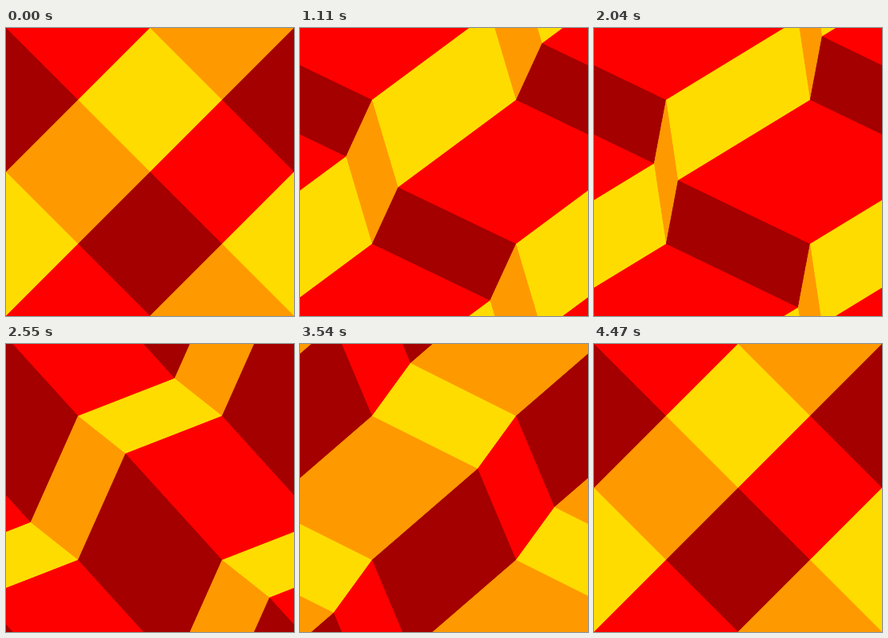
Write an HTML page with a canvas that moves like this. It is 360 by 360 pixels and loops after 4.5 s.

```html
<!DOCTYPE html>
<html>
<head>
<meta charset="utf-8">
<style>
  html, body { margin: 0; overflow: hidden; }
  canvas { display: block; }
</style>
</head>
<body>
<canvas width="360" height="360"></canvas>
<script>
const ctx = document.querySelector('canvas').getContext('2d');
const LOOP = 4500, STEP = 30, CELL = 180, HALF = 90;

// The last step repeats the first pose, so the curve closes after 149 steps
const PERIOD = LOOP / STEP - 1;

// Closed path of the moving corner: [step, x offset, y offset]
const path = [
  [0, 0, 0], [37, -57.5, 19.3], [68, -75, 10.5],
  [85, -30.7, -43], [104, 48.5, -27], [130, 19.8, -20.2]
];

// Path point by index, continued over the neighbouring loops
function point(i) {
  const n = path.length, lap = Math.floor(i / n);
  const [t, x, y] = path[i - lap * n];
  return [t + lap * PERIOD, x, y];
}

const slope = (a, b, axis) => (b[axis] - a[axis]) / (b[0] - a[0]);

// Tangent of the parabola through a point and its two neighbours
function tangent(i, axis) {
  const a = point(i - 1), b = point(i), c = point(i + 1);
  return slope(a, b, axis) + slope(b, c, axis) - slope(a, c, axis);
}

function offset(step, axis) {
  let i = 0;
  while (step >= point(i + 1)[0]) i++;
  const p = point(i), q = point(i + 1), h = q[0] - p[0], u = (step - p[0]) / h;
  const s = u * u * (3 - 2 * u);
  return p[axis] * (1 - s) + q[axis] * s
    + h * u * (1 - u) * ((1 - u) * tangent(i, axis) - u * tangent(i + 1, axis));
}

// Each tile lies between a moving corner and the next one in direction [dx, dy]
const tiles = [
  ['#ffdc00', 0, -1], ['#ff9900', -1, 0], ['#ff0000', 1, 0], ['#a40000', 0, 1]
];

function drawTile(paint, cx, cy, x, y, [color, dx, dy]) {
  const mx = cx + dx * HALF, my = cy + dy * HALF;
  ctx.fillStyle = ctx.strokeStyle = color;
  ctx.beginPath();
  ctx.moveTo(cx + x, cy + y);
  ctx.lineTo(mx + dy * HALF, my + dx * HALF);
  ctx.lineTo(cx + dx * CELL - x, cy + dy * CELL - y);
  ctx.lineTo(mx - dy * HALF, my - dx * HALF);
  ctx.closePath();
  ctx[paint]();
}

function draw(now) {
  const step = Math.floor(now % LOOP / STEP);
  const x = offset(step, 1), y = offset(step, 2);
  // Strokes first, so that no seams show between the fills
  for (const paint of ['stroke', 'fill'])
    for (let row = -1; row <= 3; row++)
      for (let col = -1; col <= 3; col++)
        if ((row + col) % 2 === 0)
          for (const tile of tiles) drawTile(paint, col * CELL, row * CELL, x, y, tile);
}

const start = performance.now();
function tick() {
  draw(performance.now() - start);
  requestAnimationFrame(tick);
}
tick();
</script>
</body>
</html>
```
